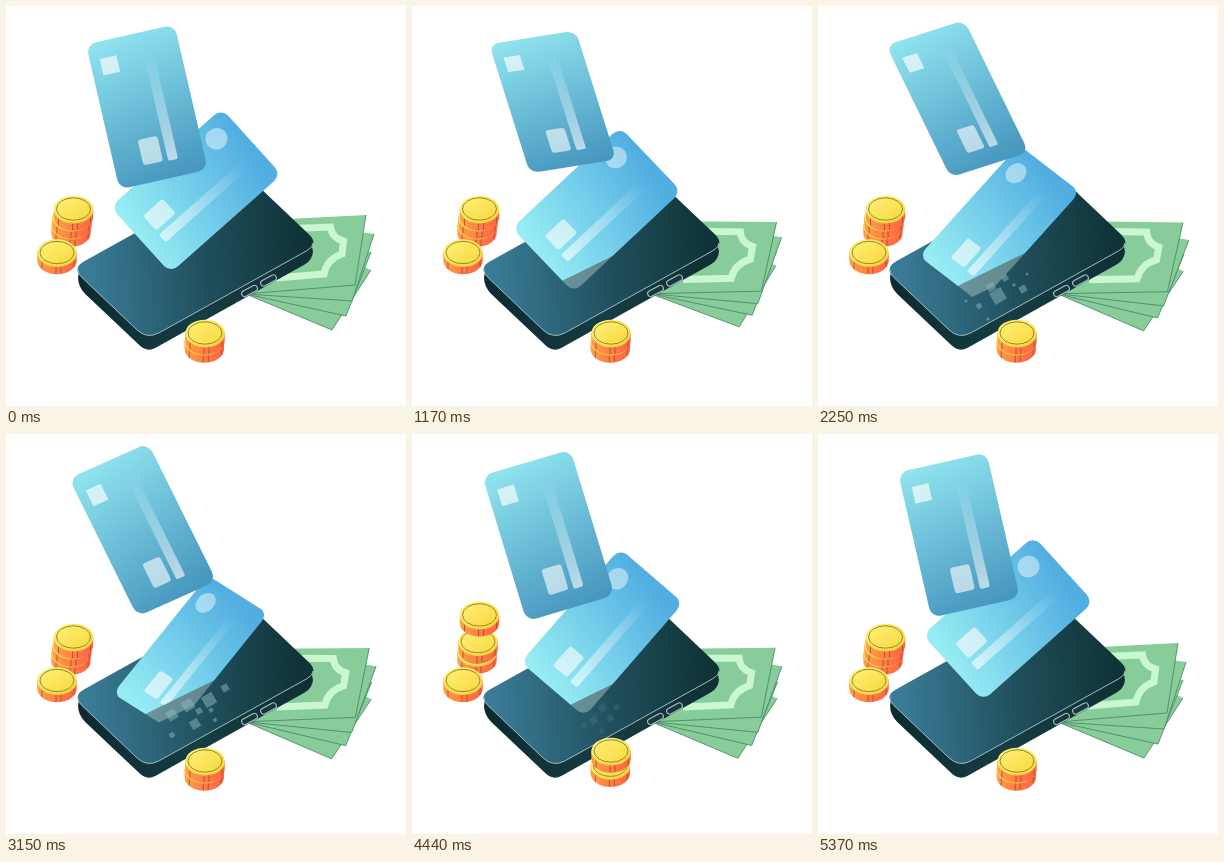
An HTML page for the animation above (5400 ms loop, 400x400 px).

```html
<!DOCTYPE html>
<html lang="en">
<head>
<meta charset="utf-8">
<title>Mobile payment</title>
<style>
html, body { margin: 0; width: 100%; height: 100%; overflow: hidden; background: #fff; }
svg { display: block; width: 100vw; height: 100vh; }
</style>
</head>
<body>
<svg id="stage" viewBox="0 0 400 400">
  <defs>
    <linearGradient id="coolDown" gradientUnits="userSpaceOnUse" x1="25" y1="0" x2="60" y2="148">
      <stop stop-color="#8fe2ee"/><stop offset="1" stop-color="#4797bf"/>
    </linearGradient>
    <linearGradient id="coolUp" gradientUnits="userSpaceOnUse" x1="60" y1="10" x2="32" y2="148">
      <stop stop-color="#52aee1"/><stop offset="1" stop-color="#97edf3"/>
    </linearGradient>
    <linearGradient id="stripe" x2="0" y2="1">
      <stop stop-color="#fff" stop-opacity="0"/><stop offset="1" stop-color="#fff" stop-opacity=".62"/>
    </linearGradient>
    <linearGradient id="screen" gradientUnits="userSpaceOnUse" x1="80" y1="250" x2="295" y2="235">
      <stop stop-color="#3a7c97"/><stop offset=".55" stop-color="#204f5c"/><stop offset="1" stop-color="#0f3437"/>
    </linearGradient>
    <linearGradient id="body" gradientUnits="userSpaceOnUse" x1="72" y1="0" x2="307" y2="0">
      <stop stop-color="#0c2a30"/><stop offset=".5" stop-color="#153d43"/><stop offset="1" stop-color="#0f2f34"/>
    </linearGradient>
    <linearGradient id="gold" x2="1" y2="1">
      <stop stop-color="#fff27a"/><stop offset="1" stop-color="#f8d63c"/>
    </linearGradient>
    <linearGradient id="copper">
      <stop stop-color="#ffa04a"/><stop offset=".5" stop-color="#ff7d45"/><stop offset="1" stop-color="#fb6446"/>
    </linearGradient>
    <clipPath id="above"><path d="M0 0H400V152.5L0 348.5Z"/></clipPath>
    <clipPath id="below"><path id="band"/></clipPath>
  </defs>
  <g id="notes"></g>
  <g id="phone"></g>
  <g clip-path="url(#below)"><rect id="ghost" width="90" height="148" rx="10" fill="#c0d3d0" opacity=".42"/></g>
  <g id="bits" fill="#8fb9bf"></g>
  <g clip-path="url(#above)"><g id="lowCard"></g></g>
  <g id="highCard"></g>
  <g id="coins"></g>
</svg>
<script>
const LOOP = 5400;
const KEY_TIMES = [0, 1170, 2250, 3150, 3930, 4860];
const $ = id => document.getElementById(id);

function add(parent, tag, attrs) {
  const node = document.createElementNS('http://www.w3.org/2000/svg', tag);
  for (const name in attrs) node.setAttribute(name, attrs[name]);
  parent.appendChild(node);
  return node;
}

// Periodic Hermite curve through values placed at KEY_TIMES.
function track(values, t) {
  const n = values.length;
  const at = i => values[(i + n) % n];
  const time = i => KEY_TIMES[(i + n) % n] + LOOP * Math.floor(i / n);
  const slope = i => (at(i + 1) - at(i - 1)) / (time(i + 1) - time(i - 1));
  let i = n - 1;
  while (KEY_TIMES[i] > t) i--;
  const span = time(i + 1) - time(i);
  const p = (t - time(i)) / span, q = 1 - p;
  return at(i) * q * q * (1 + 2 * p) + at(i + 1) * p * p * (3 - 2 * p)
    + span * p * q * (slope(i) * q - slope(i + 1) * p);
}

// Closed polygon path with softened corners.
function softPolygon(points, radius) {
  const n = points.length;
  const toward = (a, b) => {
    const k = radius / Math.hypot(b[0] - a[0], b[1] - a[1]);
    return [a[0] + (b[0] - a[0]) * k, a[1] + (b[1] - a[1]) * k];
  };
  return points.map((p, i) => {
    const start = toward(p, points[(i + n - 1) % n]);
    const end = toward(p, points[(i + 1) % n]);
    return `${i ? 'L' : 'M'}${start}Q${p} ${end}`;
  }).join('') + 'Z';
}

// Cards: corner, width vector and height vector of each pose.
const highPoses = [
  [80, 38.5, 88.5, -20, 33.5, 145],
  [77.2, 38.2, 86.5, -13.6, 40.6, 129],
  [68.1, 39.3, 78.2, -25, 64.5, 132],
  [63, 44.5, 79, -35.5, 68.5, 138],
  [64.6, 43.7, 87, -32, 54, 143.5],
  [75.5, 40, 88, -21.7, 37.3, 146.5]
];
const lowPoses = [
  [215.5, 102.5, 60, 66, -111, 98.5],
  [208, 121, 61.5, 64.5, -108, 101],
  [201, 139, 61, 47, -100, 111],
  [202, 141.5, 60, 38, -95, 118],
  [205, 127.5, 62, 45, -95.5, 118],
  [210.5, 105, 64, 62, -103, 108.5]
];

function cardMatrix(poses, t) {
  const [x, y, ux, uy, vx, vy] = poses[0].map((_, i) => track(poses.map(p => p[i]), t));
  return `matrix(${ux / 90} ${uy / 90} ${vx / 148} ${vy / 148} ${x} ${y})`;
}

function buildCard(group, fill) {
  add(group, 'rect', { width: 90, height: 148, rx: 10, fill: `url(#${fill})` });
  add(group, 'rect', { x: 53.5, y: 22, width: 10, height: 109, rx: 2, fill: 'url(#stripe)' });
  add(group, 'rect', { x: 28.5, y: 104, width: 20, height: 26, rx: 3, fill: '#fff', opacity: .6 });
}
buildCard($('highCard'), 'coolDown');
add($('highCard'), 'rect', { x: 10, y: 17, width: 17, height: 17, fill: '#fff', opacity: .65 });
buildCard($('lowCard'), 'coolUp');
add($('lowCard'), 'circle', { cx: 19.5, cy: 124, r: 11, fill: '#fff', opacity: .45, transform: 'translate(0 -100)' });

// Phone
const phone = $('phone');
add(phone, 'path', {
  d: softPolygon([[72, 262], [238, 170], [307, 238], [307, 254], [141, 346.5], [72, 281]], 10),
  fill: 'url(#body)'
});
add(phone, 'path', {
  d: softPolygon([[66, 262], [238, 166.5], [313, 238], [141, 333.5]], 14), fill: 'url(#screen)'
});
add(phone, 'path', {
  d: 'M71.8 263Q71.5 267.5 76 271.6L130.9 323.8Q141 333.5 153.3 326.7L300.7 244.8Q307 241 306.8 237',
  fill: 'none', stroke: '#9dbcc1', 'stroke-width': 1
});
for (const [x, y] of [[243.5, 285], [262.5, 274.5]]) {
  add(phone, 'rect', {
    x: -8.5, y: -3, width: 17, height: 6, rx: 3, transform: `translate(${x} ${y}) rotate(-28)`,
    fill: '#16393f', stroke: '#a9c0c3', 'stroke-width': 1.1
  });
}

// Banknotes, back to front: right edge corners and fan angles.
const notes = [
  { top: [365, 264], low: [326, 324], turn: [0, -2.2, .6, .6, .3, .2] },
  { top: [365, 246], low: [340, 310], turn: [0, -.5, 1.2, 1, 1, .7] },
  { top: [368, 228], low: [346, 295], turn: [0, 1.5, 2.8, 2, 2, 1.6] },
  { top: [360, 209], low: [349, 279], turn: [0, 3.4, 3.7, 2.4, 2.4, 1.9] }
];
for (const note of notes) {
  note.node = add($('notes'), 'g', {});
  add(note.node, 'path', { d: `M240 288L262 214L${note.top}L${note.low}Z`, fill: '#88cc99' });
  add(note.node, 'path', {
    d: `M${note.top}L${note.low}L240 288`, fill: 'none', stroke: '#4c8d6c', 'stroke-width': .9
  });
}
add(notes[3].node, 'path', {
  d: 'M275 223L324.5 221Q326 232 337.5 235L336 248Q321 253 318 268L270 272',
  fill: 'none', stroke: '#c9f8d0', 'stroke-width': 7
});

// Coins: rest centre of the top face, jump height and jump window.
const LEFT_JUMP = [4150, 5050], FRONT_JUMP = [4350, 5250];
const coins = [
  { x: 65, y: 219, lift: 1, jump: LEFT_JUMP },
  { x: 66, y: 211, lift: 4, jump: LEFT_JUMP },
  { x: 67.5, y: 203, lift: 26, jump: LEFT_JUMP },
  { x: 51, y: 246.5, lift: 0, jump: LEFT_JUMP },
  { x: 198.3, y: 335, lift: 12, jump: FRONT_JUMP },
  { x: 199, y: 327, lift: 32, jump: FRONT_JUMP }
];
for (const coin of coins) {
  coin.node = add($('coins'), 'g', {});
  add(coin.node, 'path', { d: 'M-19.7 0V8A19.7 13.7 0 0 0 19.7 8V0Z', fill: 'url(#copper)' });
  add(coin.node, 'path', {
    d: 'M-15 9.5v7M-1 14v7.2M4 13.5v7.3M17 7.5v7', fill: 'none', stroke: '#a9542f', 'stroke-width': .9
  });
  add(coin.node, 'ellipse', { cy: 1, rx: 19.7, ry: 13.5, fill: '#ffc93c' });
  add(coin.node, 'ellipse', { rx: 19.5, ry: 13.3, fill: 'url(#gold)' });
  add(coin.node, 'ellipse', {
    rx: 17, ry: 11.2, fill: 'none', stroke: '#8f8a35', 'stroke-width': 1
  });
}

// Fragments that break off the card: bursts of [x, y, size].
const bursts = [
  { time: 2250, squares: [[180, 290, 13], [161, 300, 5], [205, 283, 7], [187, 272, 6], [148, 295, 2.5], [170, 313, 3], [209, 268, 2.5], [196, 279, 3], [173, 281, 8]] },
  { time: 3150, squares: [[189, 290, 9], [166, 301, 5], [182, 271, 11], [203, 266, 12], [209, 286, 3.5], [193, 277, 6], [166, 281, 10], [205, 276, 4], [219, 254, 7]] },
  { time: 3930, squares: [[188, 269, 10], [179, 281, 10], [196, 279, 8], [202, 268, 7], [187, 292, 6], [170, 286, 6], [205, 289, 2], [233, 251, 2]] }
];
for (const burst of bursts) {
  burst.nodes = burst.squares.map(([, , size]) =>
    add($('bits'), 'rect', { x: -size / 2, y: -size / 2, width: size, height: size }));
}
const bandDepth = [0, 30, 18, 15, 13, 22];

function render(t) {
  const low = cardMatrix(lowPoses, t);
  $('lowCard').setAttribute('transform', low);
  $('ghost').setAttribute('transform', low);
  $('highCard').setAttribute('transform', cardMatrix(highPoses, t));

  const depth = Math.max(0, track(bandDepth, t));
  $('band').setAttribute('d', `M0 348.5L400 152.5V${152.5 + depth}L0 ${348.5 + depth}Z`);

  for (const note of notes) {
    note.node.setAttribute('transform', `rotate(${track(note.turn, t)} 245 289)`);
  }
  for (const coin of coins) {
    const [start, end] = coin.jump;
    const p = Math.min(1, Math.max(0, (t - start) / (end - start)));
    coin.node.setAttribute('transform', `translate(${coin.x} ${coin.y - coin.lift * Math.sin(Math.PI * p)})`);
  }
  for (const burst of bursts) {
    const age = (t - burst.time) / 600;
    const alpha = Math.max(0, 1 - age * age) * .5;
    burst.nodes.forEach((node, i) => {
      const [x, y] = burst.squares[i];
      node.setAttribute('opacity', alpha);
      node.setAttribute('transform',
        `translate(${x + age * 3} ${y + age * 6}) rotate(-31) scale(${1 - .3 * Math.abs(age) * (alpha > 0)})`);
    });
  }
}

// The disc sits near the top end of the low card.
const origin = performance.now();
function tick() {
  render((performance.now() - origin) % LOOP);
  requestAnimationFrame(tick);
}
tick();
</script>
</body>
</html>
```
